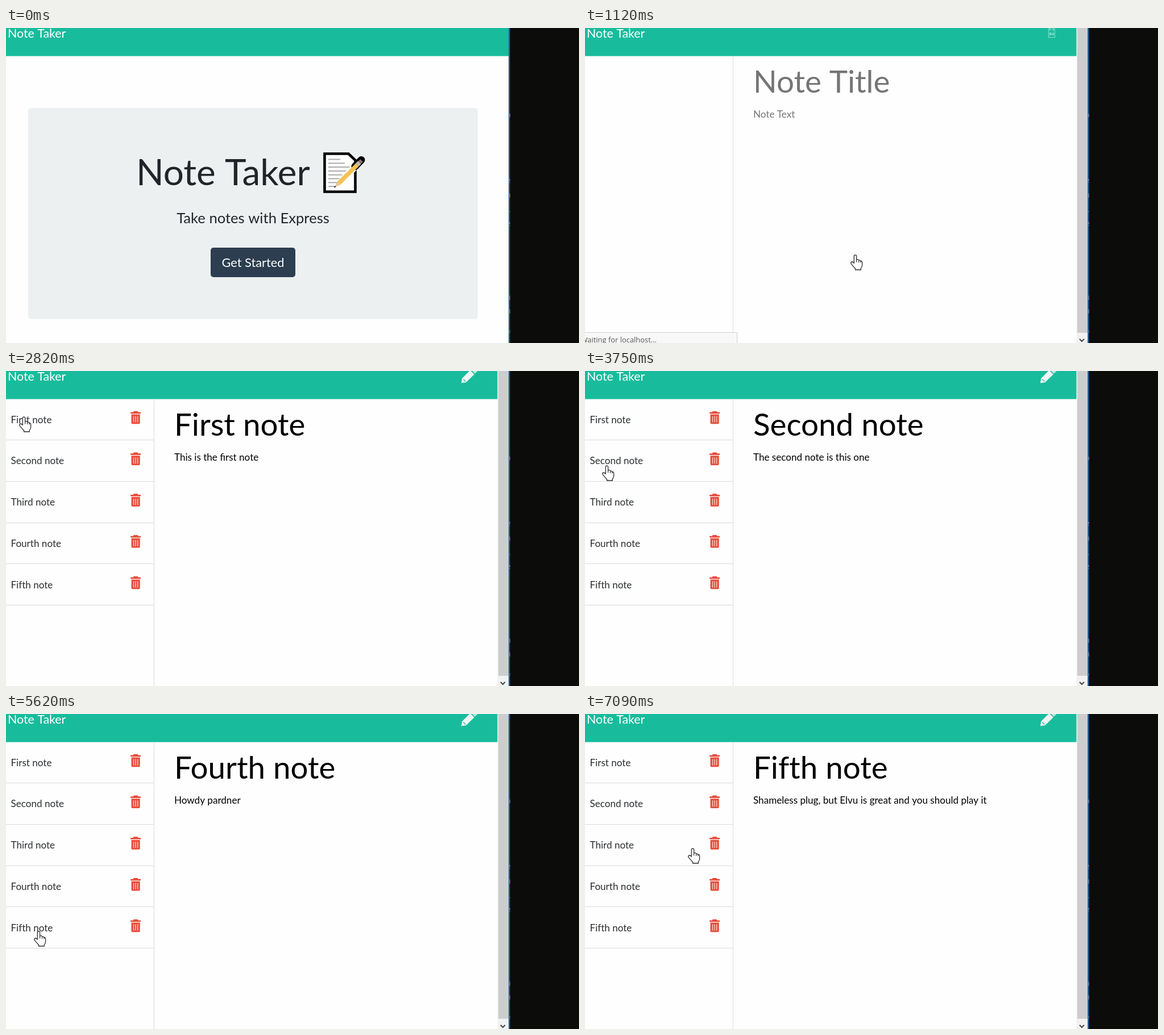
An HTML page with a canvas that plays this animation: 1008x555 px, repeating every 7180 ms.

```html
<!DOCTYPE html>
<html lang="en">
<head>
<meta charset="utf-8">
<title>Note Taker</title>
<style>
html, body { margin: 0; width: 100%; height: 100%; overflow: hidden; background: #fff; }
canvas { display: block; }
</style>
</head>
<body>
<canvas id="stage" width="1008" height="555"></canvas>
<script>
const ctx = document.getElementById('stage').getContext('2d');
const LOOP = 7180;
const SANS = 'Lato, sans-serif';
const UI = '"Open Sans", sans-serif';
const MONO = '"Noto Sans Mono", monospace';
const ROW = 72.75;

// Notes shown in the editor from a given time on; the zero-width non-joiner prevents an "ft" ligature
const notes = [
  [1120, 'Note Title', 'Note Text', '#757575'],
  [2820, 'First note', 'This is the first note', '#000'],
  [3750, 'Second note', 'The second note is this one', '#000'],
  [4610, 'Third note', 'This is the third note', '#000'],
  [5390, 'Fourth note', 'Howdy pardner', '#000'],
  [6250, 'Fif\u200cth note', 'Shameless plug, but Elvu is great and you should play it', '#000']
];

// Pointer: time, kind, left, top
const pointer = [
  [120, 'arrow', 497, 102], [200, 'arrow', 495, 150], [280, 'arrow', 490, 225],
  [350, 'arrow', 485, 300], [430, 'arrow', 479, 356], [500, 'hand', 469, 392],
  [580, 'hand', 467, 399],
  [1200, 'beam', 471, 392], [1900, 'beam', 430, 358], [1970, 'beam', 396, 331],
  [2130, 'hand', 115, 142], [2280, 'hand', 58, 104], [2360, 'hand', 23, 80],
  [3140, 'hand', 26, 136], [3290, 'hand', 29, 156], [3370, 'hand', 30, 166],
  [3830, 'hand', 31, 182], [3900, 'hand', 34, 212], [3980, 'hand', 37, 240],
  [4060, 'hand', 38, 251], [4380, 'hand', 38, 245], [4460, 'hand', 38, 240],
  [4690, 'hand', 39, 266], [4760, 'hand', 40, 292], [4840, 'hand', 40, 305],
  [5470, 'hand', 47, 375], [5620, 'hand', 49, 382],
  [6320, 'arrow', 64, 435], [6390, 'arrow', 73, 464], [6710, 'arrow', 86, 433],
  [6860, 'hand', 163, 258], [7010, 'hand', 176, 243], [7090, 'hand', 181, 236]
];

const shapes = {
  hand: new Path2D('M6.3 15V3Q6.3.8 8.4.8 10.6.8 10.6 3V9Q14 8 14.6 10.2 17.3 9.6 18 11.8 ' +
    '20.6 11.4 20.6 14V19Q20.6 22 18.3 24.2V27H8.6V25Q5 21 1.2 16.6 0 14 2 13 4.2 12.8 6.3 15Z'),
  knuckles: new Path2D('M10.6 9V13.5M14.6 10.2V14M18 11.8V14.5'),
  arrow: new Path2D('M.6.8V18.6L4.7 14.7 7.5 21.4 10.5 20.1 7.7 13.7H13.6Z'),
  beam: new Path2D('M1 1H4L5 2 6 1H9M5 2V16M1 17H4L5 16 6 17H9'),
  pen: new Path2D('M801 21.2L802.3 13 816.5-1.3 823.8 6 809.3 20Z'),
  eraser: new Path2D('M817.5-2.5L824.8 4.8 829.3.4V-4Z'),
  paper: new Path2D('M560.5 221.5H602.5L614.5 233V288.5H560.5Z')
};

const latest = (list, t) => list.filter(item => item[0] <= t).pop();

function rect(x, y, w, h, color) {
  ctx.fillStyle = color;
  ctx.fillRect(x, y, w, h);
}

function rounded(x, y, w, h, r, color) {
  ctx.fillStyle = color;
  ctx.beginPath();
  ctx.roundRect(x, y, w, h, r);
  ctx.fill();
}

function text(str, x, y, size, color, align = 'left', family = SANS) {
  ctx.font = `${size}px ${family}`;
  ctx.textAlign = align;
  ctx.fillStyle = color;
  ctx.fillText(str, x, y);
}

function line(x1, y1, x2, y2, width, color, cap = 'butt') {
  ctx.strokeStyle = color;
  ctx.lineWidth = width;
  ctx.lineCap = cap;
  ctx.beginPath();
  ctx.moveTo(x1, y1);
  ctx.lineTo(x2, y2);
  ctx.stroke();
}

function paint(path, fill, stroke, width) {
  ctx.lineCap = 'butt';
  if (fill) { ctx.fillStyle = fill; ctx.fill(path); }
  if (stroke) { ctx.strokeStyle = stroke; ctx.lineWidth = width; ctx.stroke(path); }
}

function drawTerminal() {
  rect(884.5, 0, 124, 555, '#0c0c0a');
  rect(884.5, 0, 2, 555, '#1f62a8');
  ctx.save();
  ctx.beginPath();
  ctx.rect(885, 0, 3, 555);
  ctx.clip();
  const edge = [['o', 158], ['e', 273], ['n', 299], ['l', 324], ['e', 349], ['n', 479], ['n', 503], ['f', 544]];
  for (const [ch, y] of edge) text(ch, 888, y, 14, '#8a8f96', 'right', MONO);
  ctx.restore();
}

function drawMemo() {
  paint(shapes.paper, '#fff', '#000', 4.6);
  const ends = [588, 596, 607, 607, 602, 597, 588, 579];
  ends.forEach((end, i) => line(567, 231.5 + i * 6.8, end, 231.5 + i * 6.8, 2, '#aaa'));
  line(590, 269, 624, 234, 12.5, '#fff');
  line(614, 244, 625, 232.5, 13, '#000', 'round');
  line(585, 274, 618, 241, 7.5, '#f3c254');
  line(618, 241, 622, 237, 7.5, '#b9bdc0');
  line(622, 237, 625.5, 233.5, 6.5, '#8d7468');
  ctx.fillStyle = '#e5c79a';
  ctx.beginPath();
  ctx.moveTo(578, 280.5);
  ctx.lineTo(582.4, 271.4);
  ctx.lineTo(587.6, 276.6);
  ctx.fill();
  line(577.5, 281, 580, 278.5, 2, '#444');
}

function drawHome(t) {
  rounded(39, 141, 791, 372, 5, '#ecf0f1');
  text('Note Taker', 229, 277, 63.8, '#212529');
  drawMemo();
  text('Take notes with Express', 434.5, 344, 25.6, '#212529', 'center');
  if (t >= 1040) rounded(357.8, 384.8, 153, 56, 6, '#a3adb4');
  const shade = latest([[0, '#2c3e50'], [500, '#25343f'], [580, '#1e2b37'], [890, '#1a252f']], t)[1];
  rounded(360, 387, 149, 52, 5, shade);
  text('Get Started', 434.5, 420.5, 21.8, '#fff', 'center');
}

function drawTrash(y) {
  ctx.save();
  ctx.translate(0, y);
  rounded(219, 72.5, 18.2, 2.8, 1, '#e74c3c');
  rounded(224, 70.8, 8.2, 3, 1, '#e74c3c');
  rounded(220.5, 76.5, 15.2, 16.8, [0, 0, 2, 2], '#e74c3c');
  for (const x of [224.5, 228.1, 231.7]) line(x, 79.5, x, 90.5, 1.4, '#f8d0ca');
  ctx.restore();
}

function drawNotes(t) {
  line(260.5, 49, 260.5, 555, 1, '#dcdcdc');
  if (t >= 1200) {
    notes.slice(1).forEach(([, name], i) => {
      const y = i * ROW;
      text(name, 8.5, 91.5 + y, 17.08, '#2b2e31');
      drawTrash(y);
      const edge = Math.round(121 + y) + 0.5;
      line(0, edge, 260, edge, 1, '#dcdcdc');
    });
    paint(shapes.pen, '#f0f5f5');
    paint(shapes.eraser, '#bfe6de');
    line(804.5, 14.5, 808.5, 18.5, 1.2, '#18bc9c');
  } else {
    ctx.strokeStyle = '#8fdccb';
    ctx.lineWidth = 1;
    ctx.strokeRect(815.5, -3.5, 11, 20);
    text('F3', 821, 5, 7.5, '#e4f7f3', 'center', MONO);
    text('04', 821, 13, 7.5, '#e4f7f3', 'center', MONO);
  }
  const [, title, body, color] = latest(notes, t);
  text(title, 296, 114, 54.7, color);
  text(body, 296, 158, 17.08, color);

  rect(864.5, 0, 20, 555, '#f1f1f1');
  rect(866, 0, 18.5, 537, '#cdcdcd');
  ctx.strokeStyle = '#444';
  ctx.lineWidth = 2;
  ctx.stroke(new Path2D('M870 548L874 552 878 548'));
}

function drawStatus(t) {
  if (t < 730 || t >= 1200) return;
  const waiting = t >= 1040;
  const right = waiting ? 267.5 : 118.5;
  ctx.save();
  ctx.globalAlpha = t < 890 ? 0.6 : 1;
  rect(0, 536, right, 19, '#f8f8f8');
  line(0, 536.5, right, 536.5, 1, '#d0d0d0');
  line(right, 536, right, 555, 1, '#d0d0d0');
  if (waiting) text('Waiting for localhost...', 126, 553.5, 12.9, '#555', 'right', UI);
  else text('localhost:3000/notes', 112, 553.5, 12.9, '#555', 'right', UI);
  ctx.restore();
}

function drawPointer(t) {
  const state = latest(pointer, t);
  if (!state) return;
  const [, kind, x, y] = state;
  ctx.save();
  ctx.translate(x, y);
  if (kind === 'beam') paint(shapes.beam, null, '#222', 1.2);
  else paint(shapes[kind], '#fff', '#2e2e33', 1.3);
  if (kind === 'hand') paint(shapes.knuckles, null, '#2e2e33', 1.2);
  ctx.restore();
}

function draw(t) {
  rect(0, 0, 1008, 555, '#fefefe');
  rect(0, 0, 884.5, 49.5, '#18bc9c');
  text('Note Taker', 3, 17, 21.36, '#fff');
  if (t < 1120) drawHome(t);
  else drawNotes(t);
  drawTerminal();
  drawStatus(t);
  drawPointer(t);
}

let start;
function tick(now) {
  start ??= now;
  draw((now - start) % LOOP);
  requestAnimationFrame(tick);
}
requestAnimationFrame(tick);
</script>
</body>
</html>
```
